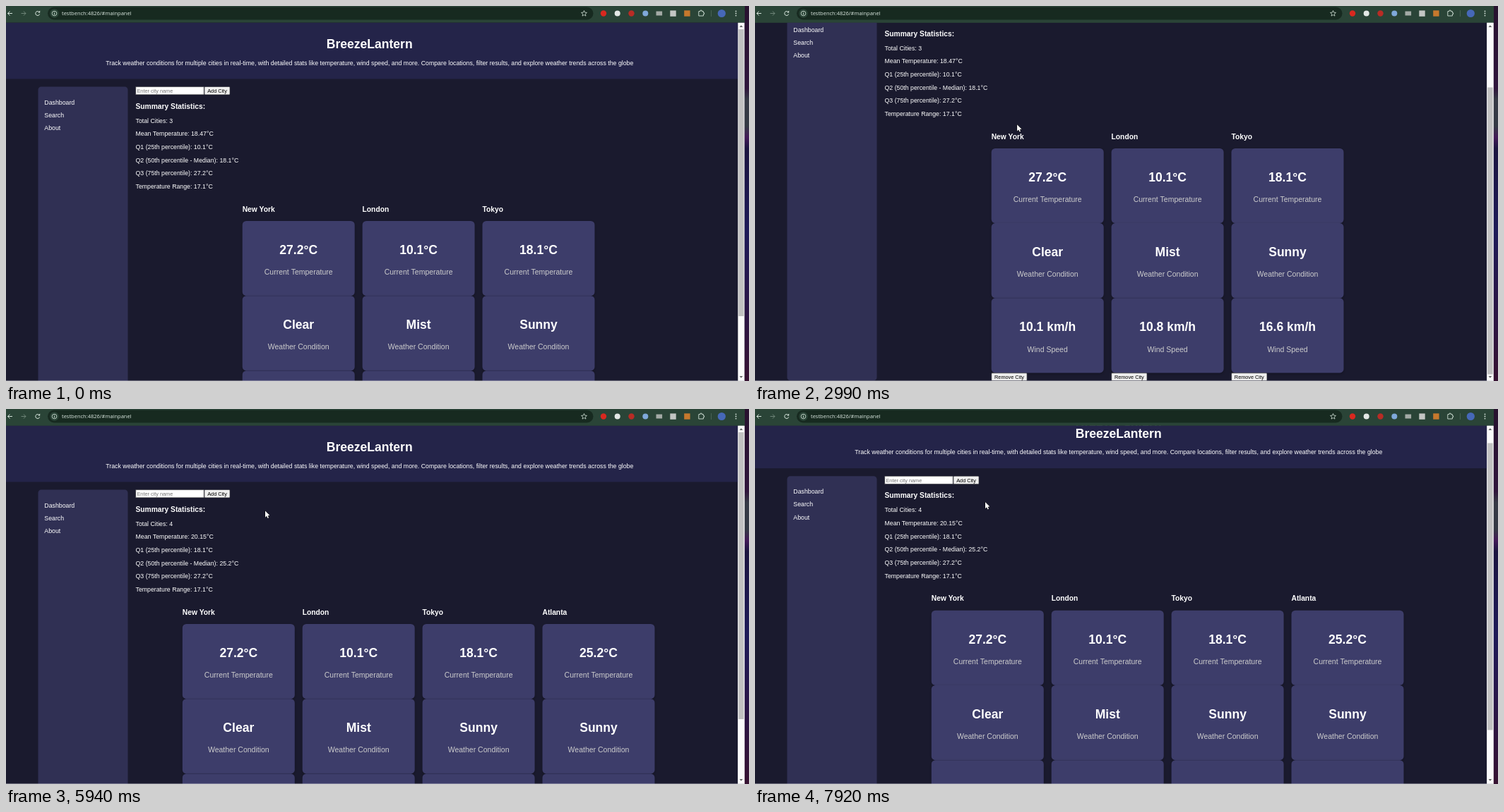
These frames come from a looping animation (1052 by 532 pixels, 7.99 s). An HTML page with a canvas:

```html
<!DOCTYPE html>
<html lang="en">
<head>
<meta charset="utf-8">
<title>Weather dashboard</title>
<style>
  html, body { margin: 0; width: 100%; height: 100%; overflow: hidden; background: #1a1a2e; }
  canvas { display: block; }
</style>
</head>
<body>
<canvas id="stage" width="1052" height="532"></canvas>
<script>
const ctx = document.getElementById('stage').getContext('2d');
const LOOP = 7990, TOP = 23.5, MAX_SCROLL = 103.3, ADD_TIME = 5940;
const SANS = '"Liberation Sans", Arial, sans-serif';

// Each key: time, then the values reached at that time
const scrollKeys = [[0, 0], [1670, 0], [1880, MAX_SCROLL], [2985, MAX_SCROLL], [3235, 0],
  [6648, 0], [6868, MAX_SCROLL], [7740, MAX_SCROLL], [7990, 0]];
const pointerKeys = [[0, 978, 545], [100, 978, 545], [870, 768, 418], [1000, 768, 418],
  [1700, 688, 200], [1900, 685, 195], [2250, 676, 205], [3200, 328, 163], [3580, 250, 119],
  [3760, 250, 119], [4020, 367, 144.5], [6340, 367, 144.5], [6680, 565, 263],
  [6880, 567.5, 267], [7160, 560, 262], [7920, 326, 132], [7990, 318, 128]];
const keyTimes = [4280, 4550, 4950, 5210, 5410, 5540, 5670];
const FOCUS_TIME = 3680;

const cities = [
  ['New York', '27.2°C', 'Clear', '10.1 km/h'],
  ['London', '10.1°C', 'Mist', '10.8 km/h'],
  ['Tokyo', '18.1°C', 'Sunny', '16.6 km/h'],
  ['Atlanta', '25.2°C', 'Sunny', '11.5 km/h']
];
const labels = ['Current Temperature', 'Weather Condition', 'Wind Speed'];

function at(keys, t) {
  let i = 1;
  while (i < keys.length - 1 && keys[i][0] < t) i++;
  const [a, b] = [keys[i - 1], keys[i]];
  const p = Math.min(1, Math.max(0, (t - a[0]) / (b[0] - a[0])));
  const eased = p * p * (3 - 2 * p);
  return a.slice(1).map((v, n) => v + (b[n + 1] - v) * eased);
}

function rect(x, y, w, h, color) {
  ctx.fillStyle = color;
  ctx.fillRect(x, y, w, h);
}

function rounded(x, y, w, h, r, color) {
  ctx.beginPath();
  ctx.roundRect(x, y, w, h, r);
  ctx.fillStyle = color;
  ctx.fill();
}

function disc(x, y, r, color) {
  ctx.beginPath();
  ctx.arc(x, y, r, 0, Math.PI * 2);
  ctx.fillStyle = color;
  ctx.fill();
}

function line(points, color, width = 1, close = false) {
  ctx.beginPath();
  points.forEach(([x, y]) => ctx.lineTo(x, y));
  if (close) ctx.closePath();
  ctx.strokeStyle = color;
  ctx.lineWidth = width;
  ctx.stroke();
}

function polygon(points, color) {
  ctx.beginPath();
  points.forEach(([x, y]) => ctx.lineTo(x, y));
  ctx.fillStyle = color;
  ctx.fill();
}

// y is the middle of the capital letters
function text(str, x, y, size, { color = '#fff', bold = false, align = 'left', family = SANS } = {}) {
  ctx.font = `${bold ? 'bold ' : ''}${size}px ${family}`;
  ctx.textAlign = align;
  ctx.fillStyle = color;
  ctx.fillText(str, x, y + size * 0.358);
}

function button(label, x, y, w, h) {
  rounded(x, y, w, h, 1.2, '#767676');
  rounded(x + 0.6, y + 0.6, w - 1.2, h - 1.2, 0.8, '#efefef');
  text(label, x + w / 2, y + h / 2, 7.31, { color: '#000', align: 'center' });
}

function drawInput(t) {
  const focused = t >= FOCUS_TIME && t < ADD_TIME;
  const typed = t < ADD_TIME ? 'atlanta'.slice(0, keyTimes.filter(k => k <= t).length) : '';
  if (focused) {
    rounded(182.9, 113.5, 98.2, 13, 1.5, '#fff');
    rounded(183.5, 114.1, 97, 11.8, 1, '#101010');
    rect(184.6, 115.2, 94.8, 9.6, '#fff');
  } else {
    rect(183.5, 114.4, 97, 11.5, '#767676');
    rect(184.2, 115.1, 95.6, 10.1, '#fff');
  }
  text(typed || 'Enter city name', 185.5, 120.2, 7.31, { color: typed ? '#000' : '#757575' });
}

function drawCity([name, ...values], x) {
  text(name, x, 288, 10.26, { bold: true });
  values.forEach((value, i) => {
    const y = 305 + i * 106.2;
    ctx.shadowColor = 'rgba(0,0,0,.25)';
    ctx.shadowBlur = 4;
    ctx.shadowOffsetY = 1.5;
    rounded(x, y, 159, 106.2, 5.5, '#3d3d6a');
    ctx.shadowColor = 'transparent';
    text(value, x + 79.5, y + 40.5, 17.54, { bold: true, align: 'center' });
    text(labels[i], x + 79.5, y + 72.5, 10.5, { color: '#ccc', align: 'center' });
  });
  button('Remove City', x, 623.7, 50.5, 11);
}

function drawPage(t, scroll) {
  const added = t >= ADD_TIME;
  ctx.save();
  ctx.beginPath();
  ctx.rect(0, TOP, 1036.3, 532 - TOP);
  ctx.clip();
  rect(0, TOP, 1037, 509, '#1a1a2e');
  ctx.translate(0, -scroll);

  rect(0, TOP, 1037, 79.9, '#242449');
  text('BreezeLantern', 514.7, 53.7, 17.54, { bold: true, align: 'center' });
  text('Track weather conditions for multiple cities in real-time, with detailed stats like temperature, ' +
    'wind speed, and more. Compare locations, filter results, and explore weather trends across the globe',
    514.8, 80.6, 8.77, { align: 'center' });

  rounded(45.5, 114.4, 127, 520, 4.4, '#303054');
  ['Dashboard', 'Search', 'About'].forEach((s, i) => text(s, 54.3, 136.5 + i * 18.1, 8.77));

  drawInput(t);
  button('Add City', 280.9, 114.4, 36.2, 11.5);
  text('Summary Statistics:', 183.5, 142, 10.26, { bold: true });
  const [count, mean, q1, q2] = added ? [4, 20.15, 18.1, 25.2] : [3, 18.47, 10.1, 18.1];
  [`Total Cities: ${count}`,
    `Mean Temperature: ${mean}°C`,
    `Q1 (25th percentile): ${q1}°C`,
    `Q2 (50th percentile - Median): ${q2}°C`,
    'Q3 (75th percentile): 27.2°C',
    'Temperature Range: 17.1°C'
  ].forEach((s, i) => text(s, 183.5, 162.6 + i * 18.63, 8.77));

  const left = added ? 249.8 : 334.7;
  cities.slice(0, count).forEach((city, i) => drawCity(city, left + i * 169.9));
  ctx.restore();
}

function drawScrollbar(scroll) {
  rect(1036.3, TOP, 9.3, 509, '#fafafa');
  rect(1037.2, 33 + scroll * 0.8, 7.4, 407, '#c1c1c1');
  polygon([[1038.6, 30], [1040.9, 27.2], [1043.2, 30]], '#606060');
  polygon([[1038.6, 525], [1040.9, 527.8], [1043.2, 525]], '#606060');
}

function drawBrowser() {
  const ink = '#d3e2d9';
  rect(0, 0, 1046, TOP, '#2a4437');
  rounded(59, 1.5, 772.5, 18, 9, '#172a20');

  line([[9, 10.5], [2.5, 10.5]], ink);
  line([[5.5, 7.5], [2.5, 10.5], [5.5, 13.5]], ink);
  line([[21.5, 10.5], [28, 10.5]], '#6f8579');
  line([[25, 7.5], [28, 10.5], [25, 13.5]], '#6f8579');

  ctx.strokeStyle = ink;
  ctx.lineWidth = 1;
  ctx.beginPath();
  ctx.arc(44.8, 10.5, 3, 0.3, 5.5);
  ctx.stroke();
  polygon([[45.2, 9.6], [48.2, 9.6], [48.2, 6.6]], ink);

  disc(68.5, 10.5, 6.2, '#2a4437');
  ctx.beginPath();
  ctx.arc(68.5, 10.5, 3.3, 0, Math.PI * 2);
  ctx.strokeStyle = ink;
  ctx.lineWidth = 0.8;
  ctx.stroke();
  rect(68.1, 10, 0.9, 2.4, ink);
  rect(68.1, 8.3, 0.9, 0.9, ink);
  text('testbench:4826/#mainpanel', 79, 10.6, 7.5, { color: '#dce8e1', family: '"Open Sans", sans-serif' });

  const star = Array.from({ length: 10 }, (_, i) => {
    const a = -Math.PI / 2 + i * Math.PI / 5, r = i % 2 ? 1.9 : 4.2;
    return [818.5 + r * Math.cos(a), 10.7 + r * Math.sin(a)];
  });
  line(star, ink, 0.8, true);

  disc(846, 10.5, 4.2, '#d9281f');
  disc(865.7, 10.5, 4, '#e4e8e6');
  disc(885.5, 10.5, 4.2, '#b92c25');
  disc(905.3, 10.5, 4, '#7fa8da');
  rect(920.5, 7.5, 8.6, 6, '#a3aaa6');
  rect(940.3, 6.4, 8.4, 8.4, '#c3c6c4');
  rect(960.2, 6.3, 8.4, 8.4, '#c7782d');

  line([[980.8, 7.6], [983, 7.6], [983, 6.2], [985.2, 6.2], [985.2, 7.6], [987.4, 7.6], [987.4, 9.6],
    [988.6, 9.6], [988.6, 11.6], [987.4, 11.6], [987.4, 14], [980.8, 14]], ink, 0.9, true);
  rect(998, 6, 0.8, 9, '#4f6b5c');
  disc(1013.3, 10.5, 5.6, '#4668b8');
  [7.4, 10.5, 13.6].forEach(y => disc(1033.5, y, 0.9, ink));
}

function drawDesktopEdge() {
  const g = ctx.createLinearGradient(0, 0, 0, 532);
  [[0, '#28122f'], [0.22, '#30153c'], [0.25, '#363a45'], [0.32, '#343a44'], [0.35, '#431a58'],
    [0.38, '#1b1440'], [0.6, '#1e1a58'], [0.8, '#2a1546'], [1, '#371232']]
    .forEach(([p, c]) => g.addColorStop(p, c));
  rect(1045.6, 0, 7, 532, g);
}

function drawPointer(x, y) {
  if (x > 184 && x < 280 && y > 114 && y < 126) {
    line([[x - 1.5, y - 4.5], [x + 1.5, y - 4.5]], '#000', 0.8);
    line([[x, y - 4.5], [x, y + 4.5]], '#000', 0.8);
    line([[x - 1.5, y + 4.5], [x + 1.5, y + 4.5]], '#000', 0.8);
    return;
  }
  const shape = [[0, 0], [0, 9.2], [2.1, 7.3], [3.5, 10.4], [5, 9.7], [3.7, 6.7], [6.5, 6.5]]
    .map(([dx, dy]) => [x + dx, y + dy]);
  line(shape, '#000', 1, true);
  polygon(shape, '#fff');
}

function frame(now) {
  const t = now % LOOP;
  const [scroll] = at(scrollKeys, t);
  drawDesktopEdge();
  drawPage(t, scroll);
  drawScrollbar(scroll);
  drawBrowser();
  rect(0, 531, 1046, 1, 'rgba(200,200,210,.45)');
  drawPointer(...at(pointerKeys, t));
  requestAnimationFrame(frame);
}

const start = performance.now();
requestAnimationFrame(function first() { frameLoop(); });
function frameLoop() {
  const step = () => frame(Math.max(0, performance.now() - start));
  window.requestAnimationFrame = (raf => () => raf.call(window, step))(window.requestAnimationFrame);
  step();
}
</script>
</body>
</html>
```
